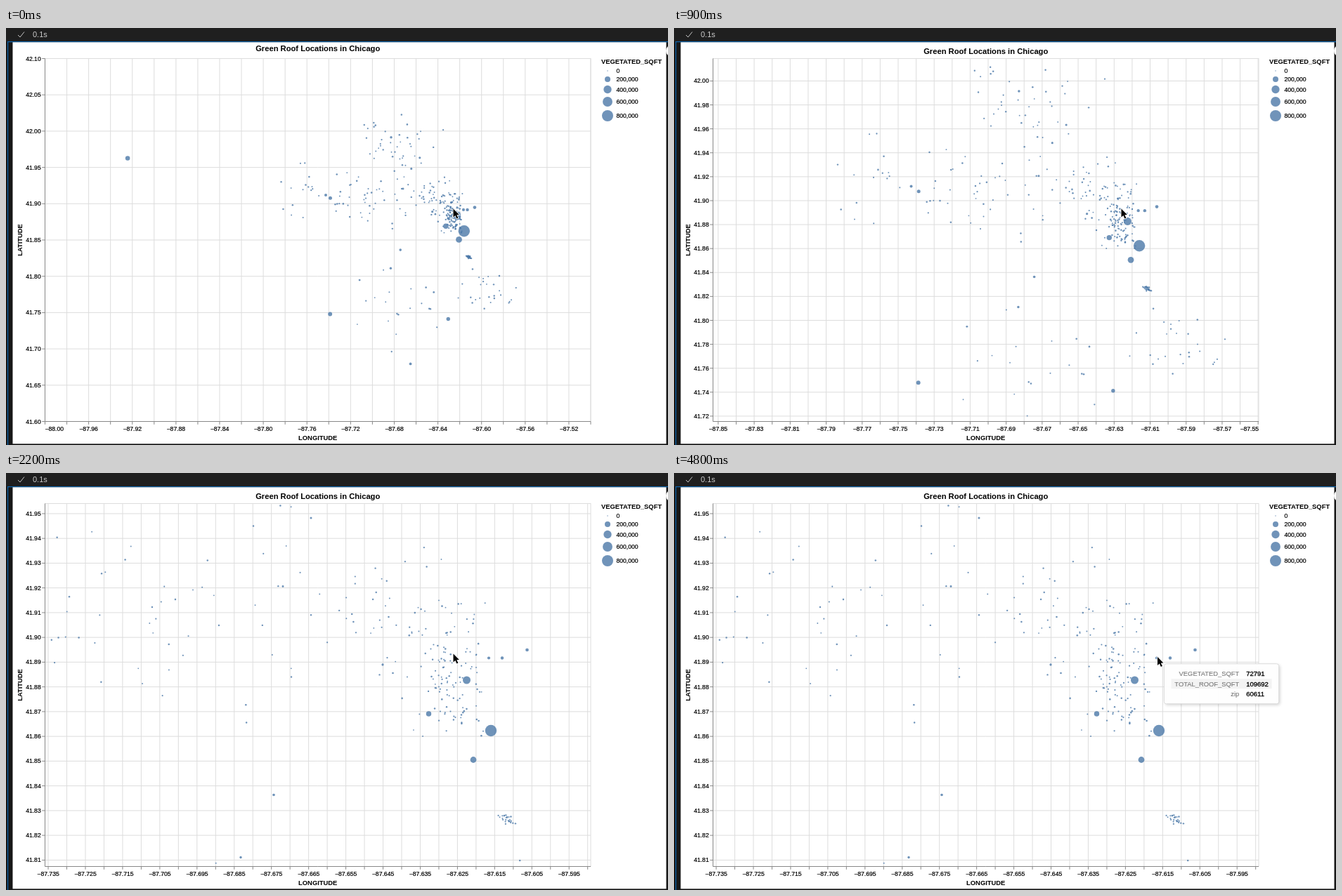
Write an HTML page with a canvas that moves like this. It is 942 px wide and 594 px high and loops after 4900 ms.

```html
<!DOCTYPE html>
<html>
<head>
<meta charset="utf-8">
<style>
html, body { margin: 0; width: 100%; height: 100%; overflow: hidden; background: #1f1f1f; }
canvas { display: block; }
</style>
</head>
<body>
<canvas id="stage" width="942" height="594"></canvas>
<script>
const ctx = document.getElementById('stage').getContext('2d');
const LOOP = 4900, STEP = 100;
const L = 55.5, T = 43.5, W = 776.5, H = 517, R = L + W, B = T + H;
// The zoom keeps this screen point and coordinate in place.
const PX = 636, PY = 257, LON = -87.62621, LAT = 41.89352;
const CLOSE = 0.14667;
const BLUE = 'rgba(76,120,168,.8)';
const SANS = '"Liberation Sans", Arial, sans-serif';

// [ms, degrees across the plot], eased on a log scale
const ZOOM = [[0, .5], [500, .4333], [900, .3032], [1600, .156], [1900, CLOSE]]
  .map(([t, span]) => [t, Math.log(span)]);
// [ms, x, y]
const POINTER = [[0, 636.5, 257.5], [2400, 636.5, 257.5], [2700, 641.5, 288.5],
  [4100, 644.5, 289], [4500, 688, 262]];
const TIPS = [
  { from: 2700, to: 4150, values: ['25348', '56605', '60602'] },
  { from: 4500, to: LOOP, values: ['72791', '109692', '60611'] }
];
const FIELDS = ['VEGETATED_SQFT', 'TOTAL_ROOF_SQFT', 'zip'];

// Largest roofs in order of size, in pixels of the closest view.
const ROOFS = [
  [690, 367], [655.5, 295], [665, 408.5], [601.5, 343], [-942, 13], [40, 770],
  [613, 794], [41, 207], [741.5, 252], [706, 263.5], [687, 263.5], [19, 192],
  [430, 1012], [381, 458.5], [336, -88], [334, 547.5], [536, 273], [475, 11],
  [434, 64], [394, 161.5], [183, 605], [543, 664], [550.5, 285], [605.5, 290]
];
// Small roofs: count, centre x, y, reach x, y
const CLUSTERS = [
  [110, 632, 285, 55, 115], [45, 540, 220, 110, 130], [24, 713, 494, 14, 7],
  [50, 250, 190, 240, 180], [38, 350, -70, 240, 150], [26, 800, 680, 150, 140],
  [18, 350, 740, 260, 260], [16, -110, 160, 150, 180]
];

let seed = 7;
const random = () => (seed = seed * 16807 % 2147483647) / 2147483647;
const spread = reach => (random() + random() - 1) * reach;

const dots = ROOFS.map(([x, y], i) => [x, y, 8.2 * (i + 1) ** -.57]);
for (const [n, x, y, w, h] of CLUSTERS)
  for (let i = 0; i < n; i++) dots.push([x + spread(w), y + spread(h), .9 + random() * .4]);

function tween(keys, t) {
  const i = keys.findIndex(k => k[0] > t);
  if (i < 0) return keys[keys.length - 1].slice(1);
  const a = keys[i - 1], b = keys[i], p = (t - a[0]) / (b[0] - a[0]);
  return a.slice(1).map((v, j) => v + (b[j + 1] - v) * p);
}

function rect(x, y, w, h, color) {
  ctx.fillStyle = color;
  ctx.fillRect(x, y, w, h);
}

function path(points, color, width = 1) {
  ctx.strokeStyle = color;
  ctx.lineWidth = width;
  ctx.beginPath();
  for (const [x, y] of points) ctx.lineTo(x, y);
  ctx.stroke();
}

const line = (x1, y1, x2, y2, color) => path([[x1, y1], [x2, y2]], color);

function disc(x, y, r, color = BLUE) {
  ctx.fillStyle = color;
  ctx.beginPath();
  ctx.arc(x, y, r, 0, 2 * Math.PI);
  ctx.fill();
}

function text(str, x, y, size, { align = 'left', color = '#000', bold = false, heavy = .22 } = {}) {
  ctx.font = `${bold ? 'bold ' : ''}${size}px ${SANS}`;
  ctx.textAlign = align;
  ctx.fillStyle = ctx.strokeStyle = color;
  const base = y + size * .355;
  ctx.fillText(str, x, base);
  if (heavy && !bold) {
    ctx.lineWidth = heavy;
    ctx.strokeText(str, x, base);
  }
}

// Round tick values: steps of 1, 2 or 5 times a power of ten.
function ticks(lo, hi, count) {
  const raw = (hi - lo) / count, power = Math.floor(Math.log10(raw));
  const f = raw / 10 ** power;
  const m = f >= Math.sqrt(50) ? 10 : f >= Math.sqrt(10) ? 5 : f >= Math.SQRT2 ? 2 : 1;
  const step = m * 10 ** power, digits = m === 10 ? -power - 1 : -power, list = [];
  for (let i = Math.ceil((lo - 1e-5) / step); i * step <= hi + 1e-5; i++)
    list.push([i * step, (i * step).toFixed(digits).replace('-', '\u2212')]);
  return list;
}

function axes(span) {
  const sx = W / span, sy = H / span;
  const xs = ticks(LON - (PX - L) / sx, LON + (R - PX) / sx, 23)
    .map(([v, label]) => ({ x: PX + (v - LON) * sx, label }));
  const ys = ticks(LAT - (B - PY) / sy, LAT + (PY - T) / sy, 15)
    .map(([v, label]) => ({ y: PY - (v - LAT) * sy, label }));

  for (const { x } of xs) line(x, T, x, B, '#ddd');
  for (const { y } of ys) line(L, y, R, y, '#ddd');
  ctx.strokeStyle = '#ddd';
  ctx.strokeRect(L, T, W, H);

  // Labels at the ends stay inside; crowded labels skip every second one.
  ctx.font = `8.625px ${SANS}`;
  for (const d of xs) {
    d.w = ctx.measureText(d.label).width;
    d.mid = Math.abs(d.x - L) < 1 ? L + d.w / 2 : Math.abs(d.x - R) < 1 ? R - d.w / 2 : d.x;
  }
  const crowded = xs.some((d, i) => i && d.mid - d.w / 2 < xs[i - 1].mid + xs[i - 1].w / 2);
  xs.forEach((d, i) => {
    line(d.x, B, d.x, B + 4.3, '#888');
    if (!crowded || i % 2 === 0) text(d.label, d.mid, 571, 8.625, { align: 'center' });
  });
  for (const { y, label } of ys) {
    line(L - 4.3, y, L, y, '#888');
    text(label, 49.7, y, 8.625, { align: 'right' });
  }
  line(L, T, L, B, '#888');
  line(L, B, R, B, '#888');
}

function frame() {
  rect(0, 0, 942, 594, '#1f1f1f');
  rect(0, 19, 942, 575, '#181818');
  rect(2, 19, 1.2, 575, '#0b64ad');
  rect(2, 19, 940, 1.2, '#0b64ad');
  rect(9.5, 20.3, 930, 572, '#fff');
  disc(947, 32.5, 8, '#fff');
  path([[17, 10], [20, 13], [26, 5.5]], '#c4c4c4');
  text('0.1s', 38, 9.5, 11, { color: '#ccc', heavy: 0 });
}

function legend() {
  text('VEGETATED_SQFT', 847, 47.7, 9.4, { bold: true });
  [61, 73, 87.5, 105, 125].forEach((y, i) => {
    disc(856, y, Math.max(.7, 4 * Math.sqrt(i)));
    text(i ? `${i * 2}00,000` : '0', 868.5, y, 8.625);
  });
}

function titles(t) {
  const style = { align: 'center', bold: true };
  text('Green Roof Locations in Chicago', 443.7, t ? 33 : 29, 11.2, style);
  text('LONGITUDE', 443.7, 583.3, 9.4, style);
  ctx.save();
  ctx.translate(19.7, 302);
  ctx.rotate(-Math.PI / 2);
  text('LATITUDE', 0, 0, 9.4, style);
  ctx.restore();
}

function tooltip(values, x, y) {
  const w = 131.5 + 5.28 * Math.max(...values.map(v => v.length));
  ctx.save();
  ctx.shadowColor = 'rgba(0,0,0,.18)';
  ctx.shadowBlur = 4;
  ctx.shadowOffsetX = ctx.shadowOffsetY = 1.7;
  ctx.fillStyle = 'rgba(255,255,255,.97)';
  ctx.beginPath();
  ctx.roundRect(x, y, w, 57, 3);
  ctx.fill();
  ctx.restore();
  ctx.strokeStyle = '#d9d9d9';
  ctx.lineWidth = .9;
  ctx.stroke();
  rect(x + 10, y + 21.5, w - 20, 14, '#f3f3f3');
  FIELDS.forEach((name, i) => {
    const row = y + 14.3 + i * 14.2;
    text(name, x + 106.7, row, 9.4, { align: 'right', color: '#777', heavy: .1 });
    text(values[i], x + 116.7, row, 9.5, { heavy: .3 });
  });
}

function pointer(x, y) {
  const shape = [[0, 0], [0, 12], [2.8, 9.4], [4.9, 14], [6.9, 13.1], [4.8, 8.7], [8.4, 8.6], [0, 0]];
  path(shape.map(([dx, dy]) => [x + dx, y + dy]), '#fff', 1.6);
  ctx.fillStyle = '#000';
  ctx.fill();
}

function draw(now) {
  const t = Math.floor(now % LOOP / STEP) * STEP;
  const span = Math.exp(tween(ZOOM, t)[0]), k = CLOSE / span;
  const [mx, my] = tween(POINTER, t);

  frame();
  axes(span);
  ctx.save();
  ctx.beginPath();
  ctx.rect(L, T, W, H);
  ctx.clip();
  for (const [x, y, r] of dots) disc(PX + (x - PX) * k, PY + (y - PY) * k, r);
  ctx.restore();
  legend();
  titles(t);
  const tip = TIPS.find(d => t >= d.from && t < d.to);
  if (tip) tooltip(tip.values, mx + 9.5, my + 9.8);
  pointer(mx, my);
}

const start = performance.now();
function loop() {
  draw(performance.now() - start);
  requestAnimationFrame(loop);
}
loop();
</script>
</body>
</html>
```
